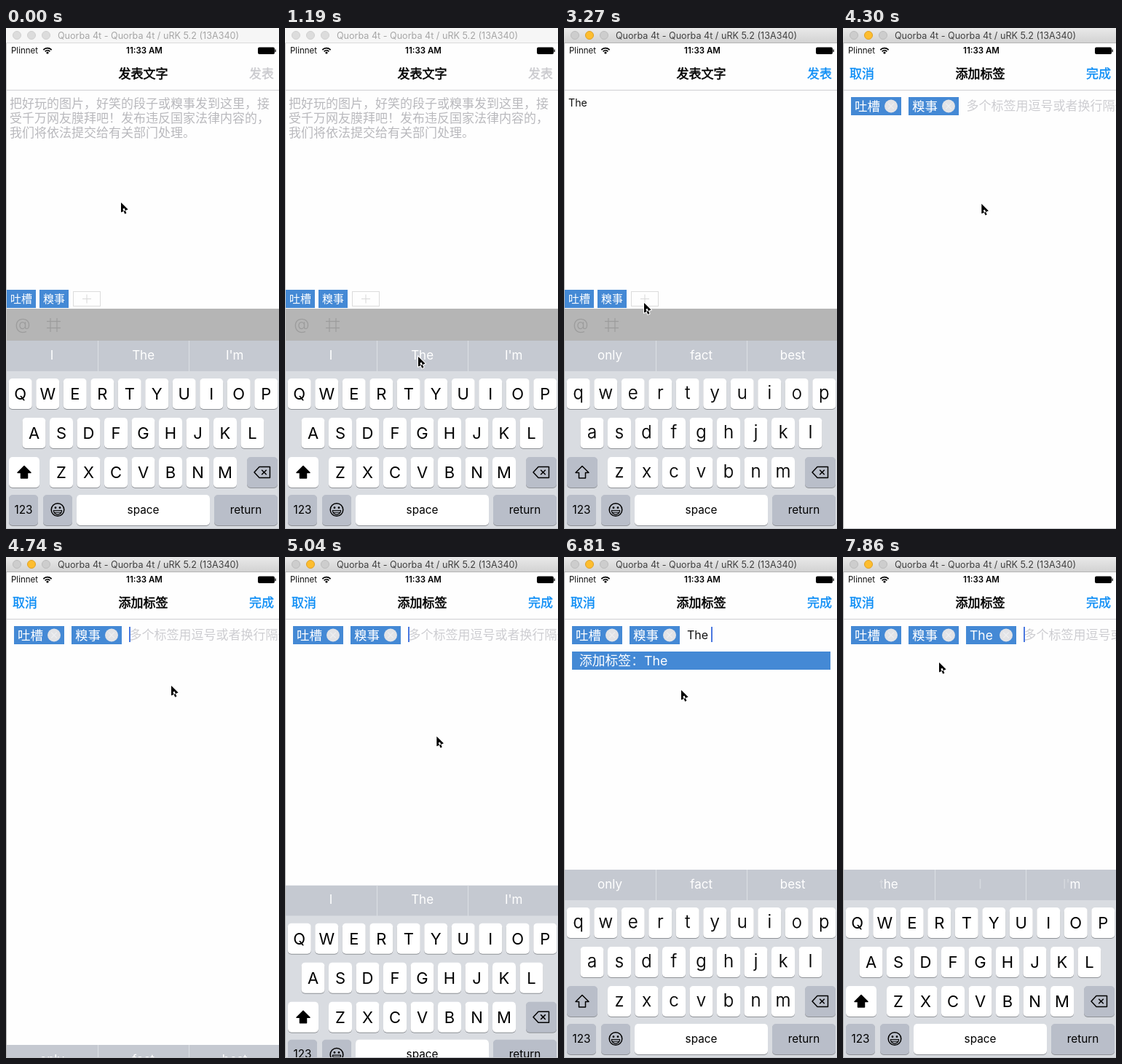
Write an HTML page with a canvas that moves like this. It is 375 by 689 pixels and loops after 8 s.

```html
<!DOCTYPE html>
<html lang="zh-CN">
<head>
<meta charset="utf-8">
<title>添加标签</title>
<style>
html, body { margin: 0; width: 100%; height: 100%; overflow: hidden; background: #fff; }
canvas { display: block; width: 375px; height: 689px; }
</style>
</head>
<body>
<canvas id="stage"></canvas>
<script>
const W = 375, H = 689, MID = 188.5, LOOP = 8000, STEP = 147.8, LAST = 53;
const FONT = 'Inter, "Noto Sans CJK SC", "Noto Sans CJK", sans-serif';
const BLUE = '#4489d5', LINK = '#0a8cf5', CARET = '#4a78e0', HINT = '#b9b9bd', GRAY = '#b9bec9';
const PITCH = 37.5, KEY_W = 32, KEY_H = 42;
// Steps at which the interface changes
const ACTIVE = 10, TYPED = 11, PRESENT = 24, RISE = 32, TAG_TYPED = 42, TAG_ADDED = 53;

const canvas = document.getElementById('stage');
const ctx = canvas.getContext('2d');
const dpr = window.devicePixelRatio || 1;
canvas.width = W * dpr;
canvas.height = H * dpr;

// Places where the pointer rests or turns
const stops = [
  { k: 0, x: 158, y: 240 }, { k: 3, x: 180, y: 506 }, { k: 8, x: 183, y: 452 },
  { k: TYPED, x: 183, y: 452 }, { k: 17, x: 319, y: 81 }, { k: 22, x: 110, y: 378 },
  { k: PRESENT, x: 111, y: 382 }, { k: RISE, x: 227, y: 177 }, { k: 38, x: 155, y: 446 },
  { k: TAG_TYPED, x: 158, y: 450 }, { k: 46, x: 161, y: 183 }, { k: LAST, x: 132, y: 145 }
];

const clamp = v => Math.max(0, Math.min(1, v));
const smooth = p => p * p * (3 - 2 * p);
const easeOut = p => 1 - Math.pow(1 - clamp(p), 3);

function pointerAt(k) {
  const i = Math.max(1, stops.findIndex(s => s.k >= k));
  const a = stops[i - 1], b = stops[i];
  const p = smooth((k - a.k) / (b.k - a.k));
  return [a.x + (b.x - a.x) * p, a.y + (b.y - a.y) * p];
}

function box(x, y, w, h, fill) {
  ctx.fillStyle = fill;
  ctx.fillRect(x, y, w, h);
}

function round(x, y, w, h, r, fill) {
  ctx.beginPath();
  ctx.roundRect(x, y, w, h, r);
  ctx.fillStyle = fill;
  ctx.fill();
}

// A thin outline (bold) gives in-between weights
function text(s, x, y, size, color, { align = 'left', weight = 400, bold = 0 } = {}) {
  ctx.font = `${weight} ${size}px ${FONT}`;
  ctx.textAlign = align;
  ctx.fillStyle = color;
  ctx.fillText(s, x, y);
  if (!bold) return;
  ctx.lineWidth = bold;
  ctx.strokeStyle = color;
  ctx.strokeText(s, x, y);
}

const centered = (s, x, y, size, color, style) =>
  text(s, x, y, size, color, { align: 'center', ...style });

function disc(x, y, r, fill, stroke) {
  ctx.beginPath();
  ctx.arc(x, y, r, 0, Math.PI * 2);
  if (fill) { ctx.fillStyle = fill; ctx.fill(); }
  if (stroke) { ctx.strokeStyle = stroke; ctx.stroke(); }
}

function line(x1, y1, x2, y2, color, width) {
  ctx.strokeStyle = color;
  ctx.lineWidth = width;
  ctx.beginPath();
  ctx.moveTo(x1, y1);
  ctx.lineTo(x2, y2);
  ctx.stroke();
}

function plus(x, y, r, color, width) {
  line(x - r, y, x + r, y, color, width);
  line(x, y - r, x, y + r, color, width);
}

function cross(x, y, r, color, width) {
  line(x - r, y - r, x + r, y + r, color, width);
  line(x - r, y + r, x + r, y - r, color, width);
}

function caret(x, y, h, k, start) {
  if ((k - start + 8) % 8 < 5) box(x, y, 2, h, CARET);
}

function titleBar(active) {
  const g = ctx.createLinearGradient(0, 0, 0, 20);
  g.addColorStop(0, active ? '#e9e9e9' : '#f6f6f6');
  g.addColorStop(1, active ? '#d3d3d3' : '#f6f6f6');
  box(0, 0, W, 20, g);
  box(0, 20, W, 1, active ? '#b5b5b5' : '#dadada');
  ctx.lineWidth = 1;
  for (let i = 0; i < 3; i++) {
    const lit = active && i === 1;
    disc(15 + i * 20, 10, 5.5, lit ? '#fdbd2f' : active ? '#cdcdcd' : '#dcdcdc',
      lit ? '#dfa023' : active ? '#bcbcbc' : '#d0d0d0');
  }
  centered('Quorba 4t - Quorba 4t / uRK 5.2 (13A340)', 195.5, 15, 12.6, active ? '#404040' : '#a6a6a6');
}

function statusBar() {
  text('Plinnet', 7, 35, 11.5, '#111');
  ctx.strokeStyle = '#000';
  ctx.lineWidth = 1.7;
  for (const r of [4.6, 7.8]) {
    ctx.beginPath();
    ctx.arc(57, 35.5, r, -Math.PI * 0.76, -Math.PI * 0.24);
    ctx.stroke();
  }
  disc(57, 34, 1.6, '#000');
  centered('11:33 AM', 190, 35, 11.5, '#000', { weight: 600 });
  round(346, 26.5, 23, 9.5, 2, '#000');
  box(369.5, 29.5, 1.3, 3.5, '#000');
}

function navBar(title, left, right, rightColor) {
  centered(title, MID, 69, 17, '#000', { bold: 0.6 });
  text(left, 9, 69, 17, LINK, { bold: 0.35 });
  text(right, 368, 69, 17, rightColor, { align: 'right', bold: 0.35 });
  box(0, 85, W, 1, '#cfcfd3');
}

function toolbar() {
  ['吐槽', '糗事'].forEach((s, i) => {
    box(1 + i * 45, 360, 40, 25, BLUE);
    centered(s, 21 + i * 45, 378.3, 15, '#fff');
  });
  ctx.strokeStyle = '#dcdcdc';
  ctx.lineWidth = 1;
  ctx.strokeRect(92.5, 362.5, 37, 20);
  plus(111, 372.5, 6, '#dcdcdc', 1.2);
  box(0, 386, W, 44, '#b5b5b5');
  centered('@', 23, 414.5, 22, '#9c9c9c', { weight: 300 });
  for (const d of [-4.5, 4.5]) {
    line(65.5 + d, 399, 65.5 + d, 418, '#9c9c9c', 1.2);
    line(56, 408 + d, 75, 408 + d, '#9c9c9c', 1.2);
  }
}

function composeScreen(k, drop) {
  const typed = k >= TYPED;
  box(0, 21, W, H, '#fefefe');
  navBar('发表文字', '', '发表', typed ? LINK : '#c9c9cd');
  if (typed) {
    text('The', 6, 108, 14.2, '#111');
    caret(35, 93, 19, k, 9);
  } else {
    ['把好玩的图片，好笑的段子或糗事发到这里，接', '受千万网友膜拜吧！发布违反国家法律内容的，',
      '我们将依法提交给有关部门处理。'].forEach((s, i) => text(s, 5, 109.5 + i * 20.3, 17, HINT));
    caret(5, 93, 19, k, 2);
  }
  ctx.save();
  ctx.translate(0, drop);
  toolbar();
  ctx.restore();
}

function chip(label, x) {
  box(x, 95, 69, 25, BLUE);
  text(label, x + 5, 113.7, 17.5, '#fff');
  disc(x + 55, 107.5, 9, '#e2e3e6');
  cross(x + 55, 107.5, 3.8, '#eff0f2', 1.2);
}

function tagScreen(k) {
  const added = k >= TAG_ADDED;
  const chips = ['吐槽', '糗事'].concat(added ? 'The' : []);
  const x = 11 + chips.length * 79;
  box(0, 21, W, H, '#fefefe');
  navBar('添加标签', '取消', '完成', LINK);
  chips.forEach((s, i) => chip(s, 11 + i * 79));
  if (k >= TAG_TYPED && !added) {
    text('The', x, 113, 16, '#111');
    caret(202, 96, 21, k, TAG_TYPED);
    box(11, 130, 355, 25, BLUE);
    text('添加标签：The', 21, 149, 17.8, '#fff');
  } else {
    text('多个标签用逗号或者换行隔开', x + 0.5, 113, 17, '#cdcdd1');
    caret(x, 96, 21, k, added ? TAG_ADDED : 31);
  }
}

function suggestions(words, fading) {
  box(0, 430, W, KEY_H, '#c5c9d1');
  words.forEach((word, i) => {
    const x = 63 + i * 125.6;
    if (i) box(Math.round(x - 63), 430, 1, KEY_H, '#dcdfe4');
    if (!fading) return centered(word, x, 455.5, 17, '#fff');
    // The first letters are still coming in
    const cut = Math.max(1, word.length - 2 + (i >> 1));
    const lead = word.slice(0, cut);
    ctx.font = `400 17px ${FONT}`;
    const left = x - ctx.measureText(word).width / 2;
    const shift = ctx.measureText(lead).width;
    text(lead, left, 455.5, 17, 'rgba(255,255,255,.3)');
    text(word.slice(cut), left + shift, 455.5, 17, '#fff');
  });
}

function key(x, y, w, fill, label) {
  round(x, y + 1, w, KEY_H, 5, '#8f9297');
  round(x, y, w, KEY_H, 5, fill);
  if (label) centered(label, x + w / 2, y + 25.7, 15.3, '#000');
}

function shiftIcon(x, y, filled) {
  ctx.beginPath();
  ctx.moveTo(x, y - 8.5);
  for (const side of [1, -1]) {
    const corners = [[9, 0.5], [4.5, 0.5], [4.5, 8]];
    if (side < 0) corners.reverse();
    corners.forEach(([dx, dy]) => ctx.lineTo(x + side * dx, y + dy));
  }
  ctx.closePath();
  ctx.lineJoin = 'round';
  ctx.lineWidth = 1.5;
  ctx.strokeStyle = ctx.fillStyle = '#000';
  ctx.stroke();
  if (filled) ctx.fill();
}

function deleteIcon(x, y) {
  ctx.beginPath();
  ctx.moveTo(x - 11, y);
  ctx.lineTo(x - 4, y - 7.5);
  ctx.lineTo(x + 10.5, y - 7.5);
  ctx.lineTo(x + 10.5, y + 7.5);
  ctx.lineTo(x - 4, y + 7.5);
  ctx.closePath();
  ctx.lineWidth = 1.5;
  ctx.strokeStyle = '#000';
  ctx.stroke();
  cross(x + 2.5, y, 3.3, '#000', 1.5);
}

function smiley(x, y) {
  ctx.lineWidth = 1.5;
  disc(x, y, 8.8, null, '#000');
  for (const side of [-3, 3]) disc(x + side, y - 2.8, 1.4, '#000');
  ctx.beginPath();
  ctx.arc(x, y + 1, 5.6, 0, Math.PI);
  ctx.closePath();
  ctx.lineWidth = 1.2;
  ctx.stroke();
  line(x - 4.5, y + 3.6, x + 4.5, y + 3.6, '#000', 1);
}

function keyboard(caps, words, fading, drop) {
  ctx.save();
  ctx.translate(0, drop);
  box(0, 472, W, 217, '#d9dce1');
  suggestions(words, fading);
  ['QWERTYUIOP', 'ASDFGHJKL', 'ZXCVBNM'].forEach((row, r) => {
    const x0 = MID - (row.length - 1) * PITCH / 2, y = 482 + r * 54;
    [...row].forEach((c, i) => {
      const x = x0 + i * PITCH;
      key(x - KEY_W / 2, y, KEY_W, '#fff');
      if (caps) centered(c, x, y + 29, 22, '#000');
      else centered(c.toLowerCase(), x, y + 28, 24, '#000', { weight: 300, bold: 0.25 });
    });
  });
  key(4, 590, 42, caps ? '#fff' : GRAY);
  shiftIcon(25, 611, caps);
  key(331, 590, 42, GRAY);
  deleteIcon(352, 611);
  key(4, 642, 40, GRAY, '123');
  key(51, 642, 40, GRAY);
  smiley(71, 662.5);
  key(97, 642, 183, '#fff', 'space');
  key(286, 642, 87, GRAY, 'return');
  ctx.restore();
}

function pointer([x, y]) {
  ctx.save();
  ctx.translate(x, y);
  ctx.beginPath();
  ctx.moveTo(0, 0);
  ctx.lineTo(0, 13.5);
  ctx.lineTo(9.6, 9.6);
  ctx.closePath();
  ctx.rotate(-Math.PI / 8);
  ctx.rect(-1.2, 9, 2.4, 7.5);
  ctx.lineWidth = 2;
  ctx.lineJoin = 'miter';
  ctx.strokeStyle = '#fff';
  ctx.stroke();
  ctx.fillStyle = '#000';
  ctx.fill();
  ctx.restore();
}

function keyboardDrop(k) {
  if (k >= RISE + 3) return 0;
  if (k >= RISE) return 241 * Math.pow(0.3, k - RISE);
  return 260 * easeOut((k - PRESENT) / 4);
}

function wordsAt(k) {
  if (k >= TAG_ADDED) return ['the', 'I', "I'm"];
  const fresh = k < TYPED || (k > RISE && k < TAG_TYPED);
  return fresh ? ['I', 'The', "I'm"] : ['only', 'fact', 'best'];
}

function draw(t) {
  const k = Math.min(LAST, Math.floor(t / STEP));
  const active = k >= ACTIVE;
  const drop = keyboardDrop(k);
  const slide = H * (1 - easeOut((k - PRESENT) / 4));
  const words = wordsAt(k);
  ctx.setTransform(dpr, 0, 0, dpr, 0, 0);
  box(0, 0, W, H, '#fefefe');
  if (slide > 0) composeScreen(k, drop);
  if (slide < H) {
    ctx.save();
    ctx.translate(0, slide);
    tagScreen(k);
    ctx.restore();
  }
  keyboard(words[0] !== 'only', words, k >= TAG_ADDED, drop);
  titleBar(active);
  statusBar();
  box(0, 21, 1, H - 21, active ? '#b4b4b4' : '#c9c9c9');
  box(0, 688, W, 1, '#c4c6ca');
  pointer(pointerAt(k));
}

const start = performance.now();
function tick() {
  draw((performance.now() - start) % LOOP);
  requestAnimationFrame(tick);
}
tick();
</script>
</body>
</html>
```
